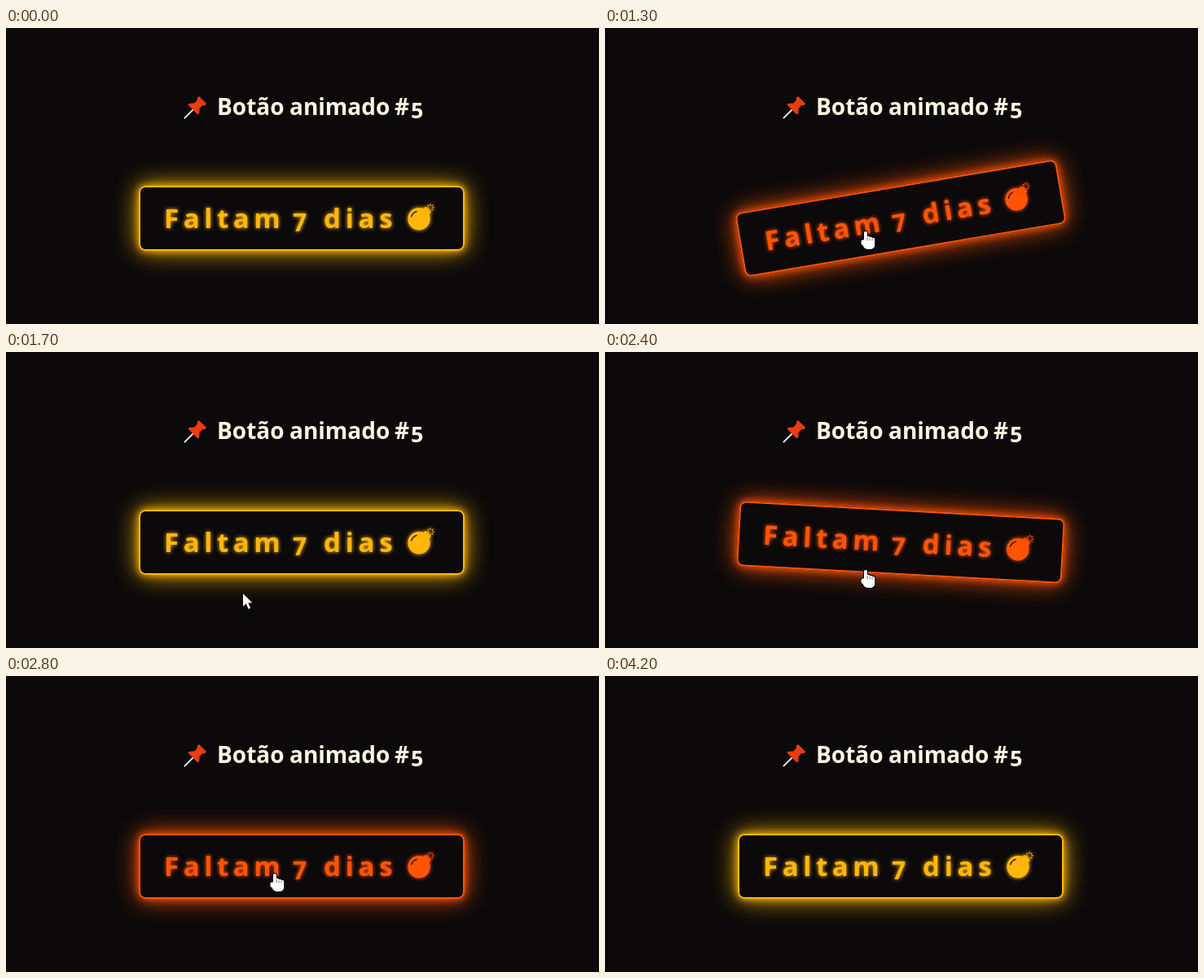
These frames come from a looping animation (728 px wide and 364 px high, 4400 ms). An HTML page with a canvas:

```html
<!DOCTYPE html>
<html lang="pt">
<head>
<meta charset="utf-8">
<title>Botão animado</title>
<style>
  html, body { margin: 0; width: 100%; height: 100%; overflow: hidden; background: #0b090a; }
  canvas { display: block; }
</style>
</head>
<body>
<canvas id="stage" width="728" height="364"></canvas>
<script>
const ctx = document.getElementById('stage').getContext('2d');
const LOOP = 4400, TICK = 100;
const BG = '#0b090a', CREAM = '#fffae3', AMBER = '#ffb70a', ORANGE = '#ff5405';
const CENTER = { x: 363, y: 234 };

// Pointer key points: [ms, x, y]
const PATH = [
  [100, 15, 2], [500, 90, 280], [800, 224, 337], [1000, 289, 296], [1300, 320, 250],
  [1700, 291, 297], [1950, 310, 320], [2400, 320, 268], [2800, 330, 243],
  [3000, 330, 248], [3400, 235, 304], [3700, 75, 239], [4200, 30, -40]
];
const HOVERS = [{ from: 1160, to: 1550 }, { from: 2391, to: 3250 }];

// Slope at a key point, flat at turning points
function slope(i, axis) {
  const a = PATH[i - 1], b = PATH[i], c = PATH[i + 1];
  if (!a || !c) return 0;
  const before = (b[axis] - a[axis]) / (b[0] - a[0]);
  const after = (c[axis] - b[axis]) / (c[0] - b[0]);
  return before * after > 0 ? 2 * before * after / (before + after) : 0;
}

function pointerAt(ms) {
  const i = PATH.findIndex(p => p[0] > ms);
  if (i < 1) return null;
  const a = PATH[i - 1], b = PATH[i], span = b[0] - a[0];
  const k = (ms - a[0]) / span, ease = k * k * (3 - 2 * k);
  const at = axis => Math.round(a[axis] + (b[axis] - a[axis]) * ease
    + span * k * (1 - k) * ((1 - k) * slope(i - 1, axis) - k * slope(i, axis)));
  return { x: at(1), y: at(2) };
}

// Fading swing in degrees, ms after the pointer enters
function swing(ms) {
  const fade = Math.max(0, 1 - (ms / 400) ** 3);
  return 10.2 * fade * Math.sin(Math.PI * ms / 90);
}

function glow(color, blur) {
  ctx.shadowColor = color;
  ctx.shadowBlur = blur;
}

// Places the left edge of the ink at x
function word(text, x, y, size, spacing = 0) {
  ctx.font = `700 ${size}px "Open Sans", "Noto Sans", sans-serif`;
  ctx.letterSpacing = spacing + 'px';
  ctx.fillText(text, x + ctx.measureText(text).actualBoundingBoxLeft, y);
}

function poly(points) {
  const path = new Path2D();
  points.forEach(([x, y]) => path.lineTo(x, y));
  path.closePath();
  return path;
}

function line(x1, y1, x2, y2, width, color) {
  ctx.strokeStyle = color;
  ctx.lineWidth = width;
  ctx.beginPath();
  ctx.moveTo(x1, y1);
  ctx.lineTo(x2, y2);
  ctx.stroke();
}

function pin() {
  const side = [[6.5, 0], [6.5, 3], [4.5, 5], [4.5, 10], [8.5, 14.5], [8.5, 17]];
  const mirror = side.map(([x, y]) => [-x, y]).reverse();
  ctx.save();
  ctx.translate(241.5, 88.5);
  ctx.rotate(Math.PI / 4);
  line(0, 15, 0, 32, 2, '#ececec');
  ctx.fillStyle = '#e93c10';
  ctx.fill(poly([...side, ...mirror]));
  ctx.restore();
}

function title() {
  pin();
  ctx.fillStyle = CREAM;
  word('Botão', 261, 107, 28);
  word('animado', 349, 107, 28);
  word('#', 477, 107, 28);
  word('5', 498, 111, 27);
}

function bomb(color) {
  ctx.beginPath();
  ctx.arc(507, 234.8, 13.7, 0, 2 * Math.PI);
  ctx.fill();
  ctx.save();
  ctx.translate(515.5, 226);
  ctx.rotate(Math.PI / 4);
  ctx.fillRect(-5, -4, 10, 6);
  ctx.restore();
  line(516, 225, 519, 222, 1.6, color);
  for (let a = 0; a < 2 * Math.PI; a += Math.PI / 4) {
    const c = Math.cos(a), s = Math.sin(a);
    line(521 + c * 2.4, 221 + s * 2.4, 521 + c * 4.8, 221 + s * 4.8, 1.3, color);
  }
  glow('transparent', 0);
  ctx.strokeStyle = BG;
  ctx.lineWidth = 1.2;
  ctx.beginPath();
  ctx.arc(507, 234.8, 9.8, Math.PI * 1.08, Math.PI * 1.42);
  ctx.stroke();
}

function button(color, angle) {
  ctx.save();
  ctx.translate(CENTER.x, CENTER.y);
  ctx.rotate(angle * Math.PI / 180);
  ctx.translate(-CENTER.x, -CENTER.y);
  ctx.beginPath();
  ctx.roundRect(163, 194, 400, 80, 8);
  ctx.fillStyle = BG;
  for (const blur of [30, 10]) {
    glow(color, blur);
    ctx.fill();
  }
  glow('transparent', 0);
  ctx.beginPath();
  ctx.roundRect(164, 195, 398, 78, 7);
  ctx.strokeStyle = color;
  ctx.lineWidth = 2;
  ctx.stroke();

  ctx.fillStyle = color;
  glow(color, 5);
  word('Faltam', 196, 246, 33, 5.6);
  word('7', 352, 250, 30);
  word('dias', 391, 246, 33, 5.8);
  bomb(color);
  ctx.restore();
}

function outlined(path) {
  ctx.lineJoin = 'round';
  ctx.strokeStyle = '#000';
  ctx.lineWidth = 2;
  ctx.stroke(path);
  ctx.fillStyle = '#fff';
  ctx.fill(path);
  ctx.lineJoin = 'miter';
}

function arrow() {
  outlined(poly([[0, 0], [0, 16], [3.7, 12.5], [6.6, 19], [9.2, 17.9], [6.4, 11.6], [11.5, 11.4]]));
}

function hand() {
  const path = new Path2D();
  path.roundRect(-2, 0, 4, 14, 2);
  for (let i = 0; i < 3; i++) path.roundRect(1.4 + 3 * i, 6 + i, 3.8, 9, 1.8);
  path.roundRect(-3.5, 10.5, 14.7, 11.5, [2, 2, 5, 6]);
  path.roundRect(-5.5, 10.5, 5, 6.5, 2);
  outlined(path);
  for (let i = 0; i < 3; i++) line(2 + 3 * i, 7.5 + i, 2 + 3 * i, 11.5, 0.8, '#444');
}

function draw(time) {
  const ms = Math.floor((time % LOOP) / TICK) * TICK;
  const hover = HOVERS.find(h => ms >= h.from && ms < h.to);
  ctx.fillStyle = BG;
  ctx.fillRect(0, 0, 728, 364);
  title();
  button(hover ? ORANGE : AMBER, hover ? swing(ms - hover.from) : 0);
  const p = pointerAt(ms);
  if (!p) return;
  ctx.save();
  ctx.translate(p.x, p.y);
  (hover ? hand : arrow)();
  ctx.restore();
}

const start = performance.now();
function loop() {
  draw(performance.now() - start);
  requestAnimationFrame(loop);
}
loop();
</script>
</body>
</html>
```
